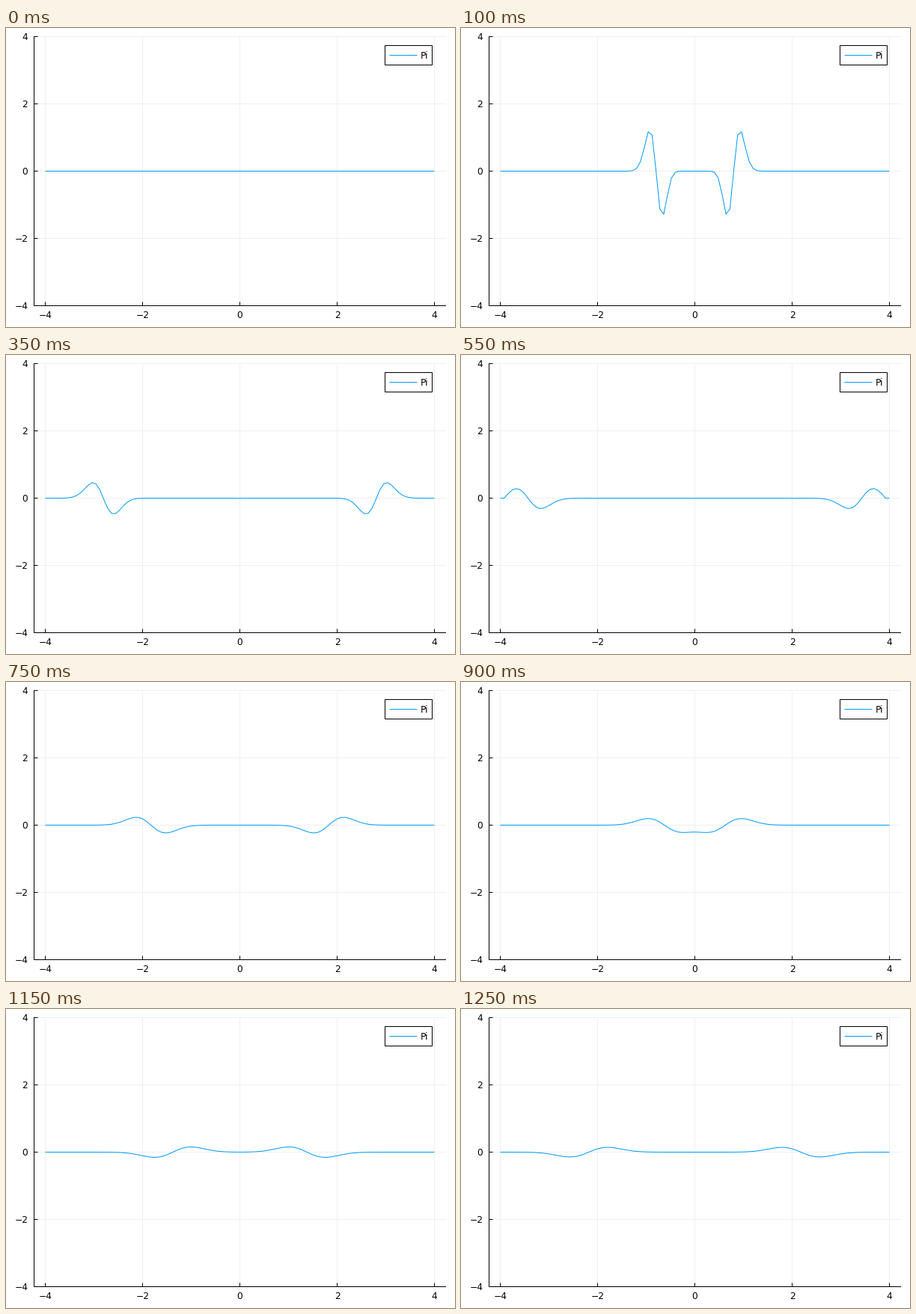
Write a matplotlib script that moves like this. It is 600 px wide and 400 px high and loops after 1300 ms.

```python
import numpy as np
import matplotlib.pyplot as plt
from matplotlib.animation import FuncAnimation
from matplotlib.patches import Rectangle

W, H, DPI = 600, 400, 100
FRAMES, INTERVAL = 26, 50
PX = 72 / DPI                      # one pixel in points
BLUE = "#009afa"
LEFT, RIGHT, TOP, BOTTOM = 37.5, 588, 11.5, 371.5
X0, Y0, X_UNIT, Y_UNIT = 312.5, 191.5, 65.0, 45.0

DX = 0.08
WALL = 4 - DX                      # outermost cells stay at zero
STEP = 0.4                         # simulated time per frame
VAR0, SPREAD = 0.005, 0.0145       # pulse variance and its growth rate
SKEW = 0.00029

plt.rcParams["font.family"] = "DejaVu Sans"
x = np.linspace(-4, 4, 101)


def sx(v):
    return X0 + X_UNIT * v


def sy(v):
    return Y0 - Y_UNIT * v


def pulse(d, var, skew):
    """Slope of a travelling, slightly skewed Gaussian at distance d."""
    s = np.sqrt(var)
    u = d / s
    he4 = u**4 - 6 * u**2 + 3
    scale = np.sqrt(VAR0) / (2 * var)
    return scale * np.exp(-u**2 / 2) * (u + skew / (6 * s**3) * he4)


def momentum(t):
    """Two opposite pulses, mirrored with a sign flip at the walls."""
    if t == 0:
        return np.zeros_like(x)
    var = VAR0 + SPREAD * t
    path = t + 0.006 + 0.0015 * t
    total = np.zeros_like(x)
    for m in range(3):
        shift = 2 * m * WALL - path
        total += (-1) ** m * (pulse(x + shift, var, SKEW)
                              + pulse(-x + shift, var, SKEW))
    total[np.abs(x) > WALL - DX / 2] = 0
    return total


fig = plt.figure(figsize=(W / DPI, H / DPI), dpi=DPI, facecolor="white")
ax = fig.add_axes([0, 0, 1, 1])
ax.set_xlim(0, W)
ax.set_ylim(H, 0)
ax.axis("off")


def stroke(xs, ys, color="black", zorder=2):
    return ax.plot(xs, ys, color=color, lw=PX, snap=False, zorder=zorder,
                   solid_capstyle="butt")[0]


def label(px, base, text, ha):
    ax.text(px, base, text, ha=ha, va="baseline", fontsize=8.8,
            color="black", zorder=6)


ticks = (-4, -2, 0, 2, 4)
for v in ticks:
    stroke([sx(v)] * 2, [TOP, BOTTOM], "#efefef", 1)
    stroke([LEFT, RIGHT], [sy(v)] * 2, "#efefef", 1)

stroke([LEFT, LEFT], [TOP - 0.5, BOTTOM + 0.5])
stroke([LEFT - 0.5, RIGHT], [BOTTOM, BOTTOM])
for v in ticks:
    stroke([sx(v)] * 2, [BOTTOM, BOTTOM - 5])
    stroke([LEFT, LEFT + 5], [sy(v)] * 2)
    text = str(v).replace("-", "\u2212")
    label(sx(v), 387.5, text, "center")
    label(29.3, sy(v) + 4.5, text, "right")

curve = stroke(sx(x), sy(0 * x), BLUE, 3)

ax.add_patch(Rectangle((506.5, 23.5), 63, 26, fc="white", ec="black",
                       lw=PX, snap=False, zorder=4))
stroke([512.5, 549.5], [36.5, 36.5], BLUE, 5)
label(554, 41.3, "Pi", "left")


def update(i):
    curve.set_ydata(sy(momentum(i * STEP)))
    return (curve,)


anim = FuncAnimation(fig, update, frames=FRAMES, interval=INTERVAL,
                     repeat=True, repeat_delay=0, blit=False)
plt.show()
```
